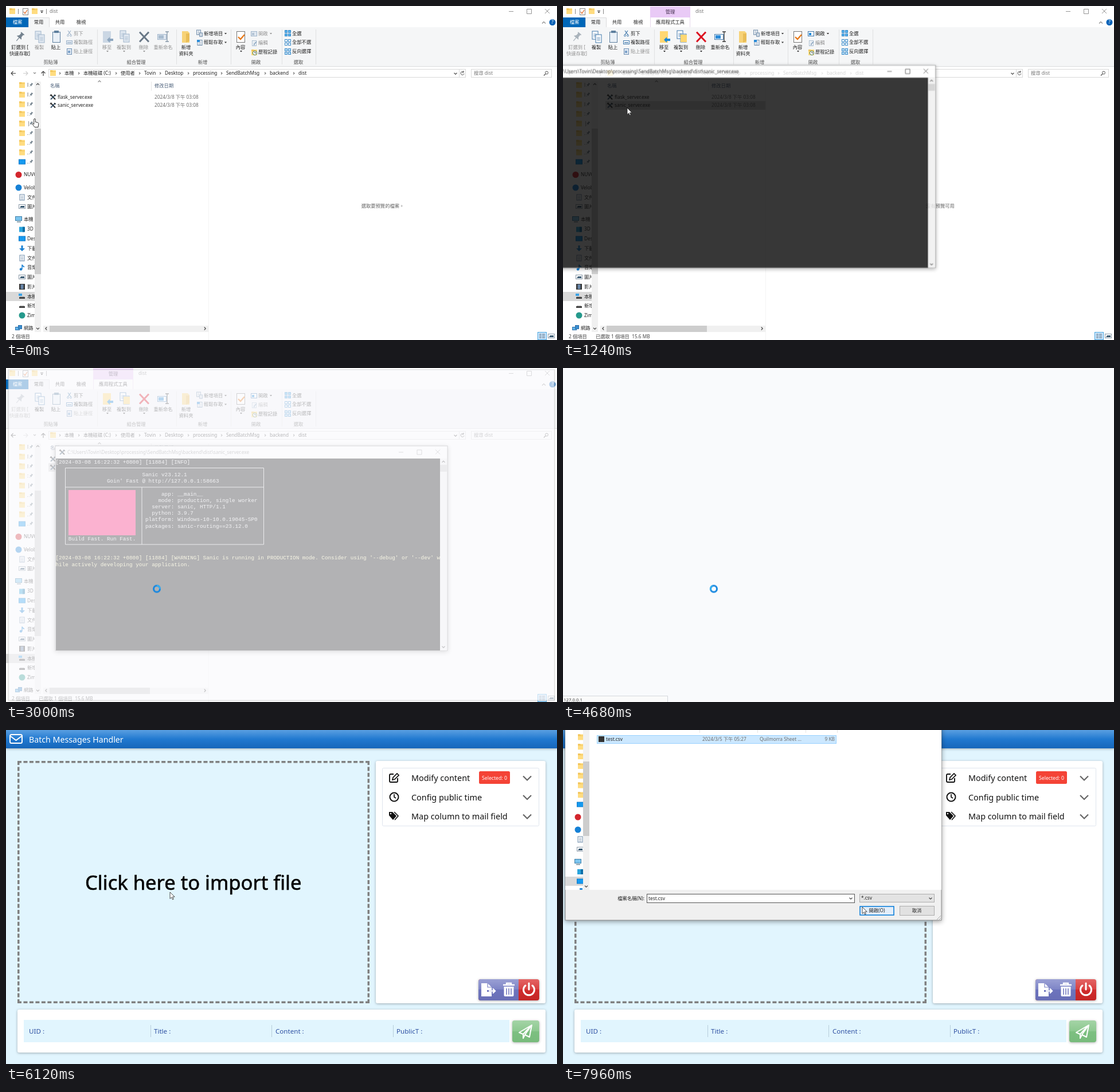
These frames come from a looping animation (961 by 583 pixels, 8000 ms). An HTML page:

```html
<!DOCTYPE html>
<html lang="zh-Hant">
<head>
<meta charset="utf-8">
<title>Batch Messages Handler</title>
<style>
html, body { margin: 0; width: 100%; height: 100%; overflow: hidden; background: #fff; }
svg { display: block; width: 961px; height: 583px; font-family: "Noto Sans", "Noto Sans CJK TC", sans-serif; }
text { white-space: pre; }
.mono { font-family: "Liberation Mono", monospace; }
.window { filter: drop-shadow(0 2px 4px rgba(0,0,0,.4)); }
.card { filter: drop-shadow(0 1px 2px rgba(0,0,0,.3)); }
#console { transform-origin: 427px 315px; }
#browser { transform-origin: 480px 291px; }
#dialog { transform-origin: 332px 106px; }
</style>
</head>
<body>
<svg id="stage" viewBox="0 0 961 583"></svg>
<script>
const LOOP = 8000;

// Drawing helpers
const R = (x, y, w, h, fill, more = '') =>
  `<rect x="${x}" y="${y}" width="${w}" height="${h}" fill="${fill}" ${more}/>`;
const B = (x, y, w, h, fill, stroke, more = '') =>
  R(x + .5, y + .5, w - 1, h - 1, fill, `stroke="${stroke}" ${more}`);
const C = (x, y, r, fill, more = '') => `<circle cx="${x}" cy="${y}" r="${r}" fill="${fill}" ${more}/>`;
const P = (d, fill = 'none', stroke = 'none', w = 1, more = '') =>
  `<path d="${d}" fill="${fill}" stroke="${stroke}" stroke-width="${w}" ${more}/>`;
const T = (x, y, s, fill = '#222', size = 8.3, more = '') =>
  `<text x="${x}" y="${y + size * .36}" fill="${fill}" font-size="${size}" ${more}>${s}</text>`;
const M = (x, y, s, fill) => T(x, y, s, fill, 8.3, 'text-anchor="middle"');
const G = (id, body, more = '') => `<g id="${id}" ${more}>${body}</g>`;
const at = (x, y, body, more = '') => `<g transform="translate(${x} ${y}) ${more}">${body}</g>`;
const chevron = (x, y, deg, s = 2.5, color = '#444', w = 1.1) =>
  at(x, y, P(`M${-s} ${-s / 2}L0 ${s / 2}L${s} ${-s / 2}`, 'none', color, w), `rotate(${deg})`);
const drop = (x, y, color = '#333') => P(`M${x - 2} ${y - 1}h4l-2 2.4z`, color);
const gradient = (id, ...stops) => `<linearGradient id="${id}" x2="0" y2="1">${stops.map(([o, c]) =>
  `<stop offset="${o}" stop-color="${c}"/>`).join('')}</linearGradient>`;

// Icons, centred on x, y
const folder = (x, y) => R(x - 5, y - 5, 10, 10, '#ffdc80') + P(`M${x - 5} ${y - 5}h4l1 2h5v1h-10z`, '#f2c55c');
const paper = (x, y, w = 9, h = 11, edge = '#6d8aa8', fill = '#fff') =>
  B(x - w / 2, y - h / 2, w, h, fill, edge) +
  P(`M${x - w / 4} ${y - 2}h${w / 2}m${-w / 2} 2.5h${w / 2}m${-w / 2} 2.5h${w / 2}`, 'none', edge, .8);
const picture = (x, y) => B(x - 6, y - 4, 12, 8, '#fff', '#8b9aa8') + P(`M${x - 4} ${y + 2}l2-3h6v3z`, '#35566f');
const screen = (x, y) => B(x - 6, y - 4.5, 12, 9, '#159af0', '#0b78c8');
const computer = (x, y) => B(x - 6, y - 5, 12, 8, '#7cc5ef', '#3f7ea6') + R(x - 3, y + 4, 7, 1.5, '#6b8798');
const disk = (x, y) => R(x - 5, y + 1, 10, 3, '#444') + R(x - 4, y, 8, 1, '#aaa');
const dot = color => (x, y) => C(x, y, 5.5, color);
const cube = (x, y) => R(x - 5, y - 4, 8, 9, '#2aa5dd') + R(x + 1, y - 4, 4, 9, '#0d6fa8');
const download = (x, y) => P(`M${x - 1.5} ${y - 5}h3v5h3.5l-5 5-5-5h3.5z`, '#1d83d4');
const note = (x, y) => C(x - 2, y + 3, 2.3, '#1d83d4') + P(`M${x} ${y + 3}v-8q1 3 4 4`, 'none', '#1d83d4', 1.5);
const film = (x, y) => R(x - 5, y - 5, 10, 10, '#333') + R(x - 2.5, y - 4, 5, 8, '#6885a8');
const net = (x, y) => B(x - 6, y - 2, 8, 6, '#62b5ea', '#2c6ea8') + B(x - 1, y - 5, 7, 7, '#3a8ed0', '#2c6ea8');
const pin = (x, y, k, color) => at(x, y,
  P('M-3-7h6v1.5h-1v4l2.5 3h-4v6h-1v-6h-4l2.5-3v-4h-1z', color), `rotate(40) scale(${k})`);
const tools = (x, y) => P(`M${x - 4} ${y - 4}l8 8`, 'none', '#222', 1.8) +
  P(`M${x + 4} ${y - 4}l-8 8`, 'none', '#39556d', 1.8) + P(`M${x - 5} ${y - 2}l2-3m5 1l3 2`, 'none', '#222', 1.3);
const winButtons = (x, y, gap, color = '#333') => P(`M${x - 4} ${y + .5}h8M${x + gap - 4} ${y - 3.5}h8v8h-8z` +
  `M${x + 2 * gap - 4} ${y - 4}l8 8m0-8l-8 8`, 'none', color, .9);

const grey = '#929292';

function ribbon(active) {
  const ink = active ? '#222' : grey, off = active ? grey : '#222';
  const edge = active ? '#3f77aa' : '#9fb4ca', sheet = active ? '#fff' : '#dfe7f0';
  const two = (x, y) => paper(x - 3, y - 3, 11, 15, edge, sheet) + paper(x + 3, y + 3, 11, 15, edge, sheet);
  const arrow = (x, y) => P(`M${x} ${y}l5-5v3h6v4h-6v3z`, active ? '#1a86d8' : '#8da6bf');
  return pin(24, 54, 1.2, active ? '#aab3bb' : '#74828f') +
    M(24, 72, '釘選到 [', off) + M(24, 83, '快速存取]', off) +
    two(59, 54) + M(58, 72, '複製', ink) +
    P('M108 43l5 7m0-7l-5 7', 'none', edge, 1.2) + C(108, 51.5, 1.5, 'none', `stroke="${edge}"`) +
    C(113, 51.5, 1.5, 'none', `stroke="${edge}"`) + T(118, 48, '剪下', ink) +
    B(105, 60, 11, 7, sheet, edge) + P('M107 64h7', 'none', edge, 1.5) + T(118, 63.5, '複製路徑', ink) +
    R(169, 44, 14, 20, active ? '#ffd772' : '#cbd7e4') + arrow(176, 59) + M(176, 72, '移至', ink) + drop(177, 79, ink) +
    two(207, 53) + (active ? R(205, 50, 11, 13, '#ffd772') : '') + M(205.5, 72, '複製到', ink) + drop(206, 79, ink) +
    P('M233 45.5l16 17m0-17l-16 17', 'none', active ? '#dc1020' : '#697887', 3) + M(240, 72, '刪除', ink) + drop(241, 79, ink) +
    B(264, 49, 16, 10, sheet, edge) + R(266, 51, 9, 6, active ? '#2a8bd8' : '#a9bccf') +
    P('M278 45h6m-3 0v17m-3 0h6', 'none', active ? '#333' : '#8395a6', 1.3) + M(274, 72, '重新命名', ink) +
    B(427, 44, 11, 9, sheet, edge) + R(429, 47, 4, 4, active ? '#1a86d8' : '#b2c3d4') + T(440, 48, '開啟', ink) + drop(462, 48, ink);
}

function ribbonFixed() {
  const tile = (x, y, fill) => [0, 6].map(i => [0, 6].map(j => B(x + i, y + j, 5, 5, fill, '#3689c9')).join('')).join('');
  return R(0, 37, 961, 68, '#f5f6f7') + R(0, 105, 961, 1, '#dadbdc') +
    R(0, 20, 39, 17, '#0067b8') + M(20, 28, '檔案', '#fff') +
    P('M39.5 37v-16.5h36v16.5', '#f5f6f7', '#dadbdc') + M(57, 28, '常用') + M(94, 28, '共用') + M(131, 28, '檢視') +
    [159, 297, 392, 481, 540].map(x => R(x, 41, 1, 61, '#e0e1e2')).join('') +
    [[78, '剪貼簿'], [227, '組合管理'], [343, '新增'], [436, '開啟'], [510, '選取']].map(([x, s]) => M(x, 98, s, '#555')).join('') +
    B(81, 45, 14, 19, '#e9f0f7', '#5d7f9e') + R(84, 43, 8, 4, '#5d7f9e') + M(87, 72, '貼上') +
    B(106, 74, 9, 11, '#dfe8f2', '#6e90b4') + R(108, 78, 4, 4, '#7ba0c8') + T(118, 79, '貼上捷徑', grey) +
    P('M307 44h10l3 3v17h-13z', '#f7d378') + P('M314 48h6v13l-6 3z', '#e9bd58') + M(314, 72, '新增') + M(314, 83, '資料夾') +
    paper(336, 46, 8, 9) + paper(340, 50, 6, 7) + T(345, 48, '新增項目') + drop(383, 48) +
    paper(338, 64, 9, 10) + R(333, 59, 5, 4, '#2a8bd8') + T(345, 63.5, '輕鬆存取') + drop(383, 63.5) +
    B(402, 44, 15, 20, '#fff', '#777') + P('M405 54l4 4 7-8', 'none', '#e77818', 2.4) + M(409, 72, '內容') + drop(410, 79) +
    paper(433, 65, 8, 10, '#a8bccf') + P('M432 68l5-6', 'none', '#8aa5c0', 1.5) + T(440, 64, '編輯', grey) +
    folder(433, 81) + C(434, 82, 3.6, '#fff', 'stroke="#3f6f45"') + P('M434 80v2h2', 'none', '#333') + T(440, 80, '歷程記錄') +
    tile(486, 42, '#58b4ee') + T(499, 48, '全選') + tile(486, 58, '#fff') + T(499, 63, '全部不選') +
    tile(486, 74, '#bfe1f7') + T(499, 79, '反向選擇') +
    chevron(938, 29, 180, 3, '#888') + C(953, 28.5, 5.5, '#0a63b8') + M(953, 28.5, '?', '#fff');
}

function sidebar() {
  const rows = [[294.5, dot('#d3262d'), 'NUVO'], [317, dot('#1681d6'), 'Velobox'], [334, paper, '文件'], [350, picture, '圖片'],
    [372, computer, '本機'], [389.5, cube, '3D 物件'], [406, screen, 'Desktop'], [423, download, '下載'], [440, paper, '文件'],
    [456.5, note, '音樂'], [473, picture, '圖片'], [490, film, '影片'], [507, disk, '本機磁碟'], [523, disk, '新增'],
    [540, dot('#25998c'), 'Zimp'], [562, net, '網路']];
  const quick = [...'lll:|...'].map((c, i) => {
    const y = 138 + i * 16.8;
    return folder(28, y) + T(37, y, c, '#555') + pin(43.5, y, .55, '#71808c');
  }).join('');
  return R(0, 499, 50, 16, '#d9d9d9') + quick + screen(28, 272) + T(37, 272, '.', '#555') + pin(43.5, 272, .55, '#71808c') +
    '<clipPath id="pane"><rect y="130" width="50" height="440"/></clipPath><g clip-path="url(#pane)">' +
    rows.map(([y, icon, s]) => {
      const outer = [294.5, 317, 372, 562].includes(y);
      return icon(outer ? 22 : 28, y) + T(outer ? 31 : 37, y, s);
    }).join('') + '</g>' + R(22, 502, 6, 4, '#3aa2e6') +
    R(50, 132, 11, 437, '#f0f0f0') + R(50, 214, 11, 254, '#cdcdcd') + chevron(55.5, 136.5, 180) + chevron(55.5, 563, 0);
}

function explorer() {
  const crumbs = [[102, '本機'], [135, '本機磁碟 (C:)'], [200, '使用者'], [241, 'Tovin'], [277, 'Desktop'],
    [326, 'processing'], [384, 'SendBatchMsg'], [460, 'backend'], [510, 'dist']];
  const file = (y, name) => tools(82, y) + T(90, y, name) + T(259, y, '2024/3/8 下午 03:08', '#6d6d6d');
  const row = (id, fill) => G(id, R(74, 166, 279, 15, fill));
  return R(0, 0, 961, 583, '#fff') + folder(11, 9) + R(21, 5, 1, 9, '#888') + B(29, 4, 10, 12, '#fff', '#888') +
    P('M31 10l2 3 4-6', 'none', '#e06a28', 1.3) + folder(50, 9) + P('M60 8.5h5', 'none', '#333') + drop(62.5, 11) +
    R(70, 5, 1, 9, '#888') + winButtons(881, 9, 31.5, '#8a8a8a') + ribbonFixed() +
    G('idle', T(76, 9.5, 'dist', '#777') + ribbon(false) + M(657, 349.5, '選取要預覽的檔案。', '#666')) +
    G('active', R(152, 1, 70, 19, '#e9caf6') + M(187, 10.5, '管理', '#45304f') +
      P('M152.5 20v17m69-17v17', 'none', '#e6d7ec') + M(187, 28, '應用程式工具') + T(231, 9.5, 'dist', '#777') +
      ribbon(true) + M(658, 349.5, '沒有預覽可用', '#666') + T(57, 577, '已選取 1 個項目  15.6 MB', '#444')) +
    P('M17 117.5h-8m3.5-3.5l-3.5 3.5 3.5 3.5', 'none', '#444', 1.1) +
    P('M30 117.5h8m-3.5-3.5l3.5 3.5-3.5 3.5', 'none', '#ccc', 1.1) + chevron(50, 117, 0, 2, '#888') +
    P('M65 122v-8m-3.5 3.5l3.5-3.5 3.5 3.5', 'none', '#444', 1.2) +
    B(74, 110, 728, 15, '#fff', '#d9d9d9') + folder(82, 117) +
    crumbs.map(([x, s]) => chevron(x - 8, 117.5, -90, 1.8, '#666') + T(x, 117.5, s)).join('') +
    chevron(784, 118, 0) + R(790, 110, 1, 15, '#d9d9d9') + P('M798 115a3 3 0 1 0 1 3m-1-5v3h-3', 'none', '#555') +
    B(811, 110, 141, 15, '#fff', '#d9d9d9') + T(816, 117.5, '搜尋 dist', '#777') +
    C(943, 116.5, 2.5, 'none', 'stroke="#555"') + P('M941 118.5l-3 3', 'none', '#555', 1.3) +
    sidebar() + chevron(163, 131.5, 180, 2.5, '#888') + T(77, 139, '名稱', '#4c607a') + R(253, 132, 1, 16, '#e5e5e5') +
    T(259, 139, '修改日期', '#4c607a') + row('hover', '#e5f3ff') + row('selected', '#cce8ff') + row('resting', '#d9d9d9') +
    file(159, 'flask_server.exe') + file(173.5, 'sanic_server.exe') +
    R(353, 132, 1, 451, '#f3f3f3') + R(65, 558, 288, 11, '#f0f0f0') + R(76, 558, 175, 11, '#cdcdcd') +
    chevron(70, 563, 90) + chevron(347, 563, -90) + T(10, 577, '2 個項目', '#444') +
    B(927, 569, 16, 14, '#cce8ff', '#4aa3dc') + P('M930 573h4m1 0h5M930 576h4m1 0h5M930 579h4m1 0h5', 'none', '#456') + picture(951, 576);
}

function consoleWindow() {
  const col = n => 86.5 + 5.59 * n, line = n => 163.5 + 11.17 * n;
  const put = (n, c, s, fill = '#e4e4e4') => T(col(c), line(n), s, fill, 9.32, 'class="mono"');
  const stamp = '[2024-03-08 16:22:32 +0800] [11884] ';
  const facts = [['app', '__main__'], ['mode', 'production, single worker'], ['server', 'sanic, HTTP/1.1'],
    ['python', '3.9.7'], ['platform', 'Windows-10-10.0.19045-SP0'], ['packages', 'sanic-routing==23.12.0']];
  const output = put(0, 0, stamp + '[INFO]') +
    P('M103.5 174.5h346v133.5h-346zM103.5 208h346M237 208v100', 'none', '#ccc') +
    put(2, 27, 'Sanic v23.12.1') + put(3, 16, "Goin' Fast @ http://127.0.0.1:58663") + R(109, 213, 117, 79, '#ff0d68') +
    facts.map(([k, v], i) => put(5 + i, 36 - k.length, k + ':') + put(5 + i, 38, v)).join('') +
    put(12, 4, 'Build Fast. Run Fast.') +
    put(15, 0, stamp + "[WARNING] Sanic is running in PRODUCTION mode. Consider using '--debug' or '--dev' w", '#f5efb0') +
    put(16, 0, 'hile actively developing your application.', '#f5efb0');
  return R(86, 136, 684, 357, '#fff', 'stroke="#777" stroke-width=".8"') + tools(98, 147) +
    G('caption', T(107, 147, 'C:\\Users\\Tovin\\Desktop\\processing\\SendBatchMsg\\backend\\dist\\sanic_server.exe') + winButtons(689, 146.5, 32)) +
    R(87, 158, 670, 335, '#0c0c0c') + R(757, 158, 12, 335, '#f0f0f0') + R(757, 169, 12, 12, '#cdcdcd') +
    chevron(763, 163.5, 180) + chevron(763, 487, 0) + G('caret', R(87, 166, 5, 2, '#eee')) + G('output', output);
}

function app() {
  const dashed = (d, gap) => P(d, 'none', '#808080', 3.5, `stroke-dasharray="7 ${gap}"`);
  const option = (y, s) => T(707, y, s, '#111', 14.4) + chevron(909, y, 0, 7, '#666', 2.2);
  const fields = [[40, 'UID :'], [258, 'Title :'], [470, 'Content :'], [681, 'PublicT :']];
  return R(0, 0, 961, 583, '#e1f5fe') + R(0, 0, 961, 32, 'url(#blue)', 'class="card"') +
    R(7, 8, 21, 15, 'none', 'rx="2.5" stroke="#fff" stroke-width="2"') + P('M8 11l9.5 7 9.5-7', 'none', '#fff', 2) +
    T(40, 16.5, 'Batch Messages Handler', '#fff', 14.2) +
    dashed('M20 55.75h614M20 475.25h614', 3.466) + dashed('M21.75 54v423M632.25 54v423', 3.4) +
    T(138, 267, 'Click here to import file', '#000', 34.6, 'stroke="#000" stroke-width=".6"') +
    R(645, 54, 296, 423, '#fff', 'rx="3" class="card"') + B(656, 66, 274, 102, '#fff', '#dfe5ee', 'rx="2"') +
    option(84, 'Modify content') + option(117.5, 'Config public time') + option(151, 'Map column to mail field') +
    R(825, 72, 54, 22, '#f44336', 'rx="2.5"') + T(830, 83.5, 'Selected: 0', '#fff', 8.7) +
    P('M676 77h-5q-2 0-2 2v10q0 2 2 2h10q2 0 2-2v-5', 'none', '#111', 1.9) + P('M674 87l1-4 7-7 3 3-7 7z', '#fff', '#111', 1.7) +
    C(677, 117, 7.5, 'none', 'stroke="#111" stroke-width="2"') + P('M677 112v5l3 2', 'none', '#111', 1.7) +
    P('M668 143h6l7 7-6 7-7-8z', '#111') + P('M677 143l7 7-6 7', 'none', '#111', 1.6) + C(671, 146, 1.2, '#fff') +
    `<g class="card">${R(824, 435, 106, 37, 'url(#red)', 'rx="4"')}${P('M828 435h66v37h-66q-4 0-4-4v-29q0-4 4-4z', 'url(#violet)')}</g>` +
    P('M829 442h11l7 7v5h-8v3h8v8h-18z', '#fff') + P('M840 442v7h7', 'none', '#7b80c4', 1.2) +
    P('M842 455.5h11m-4-4l4 4-4 4', 'none', '#fff', 2.3) +
    P('M867 445h20M873 444v-2h8v2', 'none', '#fff', 2.3) + P('M868.5 448h17v15q0 2-2 2h-13q-2 0-2-2z', '#fff') +
    P('M873 451v11m4-11v11m4-11v11', 'none', '#757ac0', 1.6) +
    P('M906 446a9.5 9.5 0 1 0 12 0M912 442v11', 'none', '#fff', 3, 'stroke-linecap="round"') +
    R(20, 488, 921, 75, '#fff', 'rx="3" class="card"') + R(31, 506, 847, 39, '#e1f5fe') +
    [252, 463, 675].map(x => R(x, 515, 1, 21, '#b7cddb')).join('') +
    fields.map(([x, s]) => T(x, 525.5, s, '#2f51a3', 11.6)).join('') +
    R(883, 507, 47, 38, 'url(#green)', 'rx="4" class="card"') +
    P('M895 528l22-13-4 21-8-4-3 6v-7zM902 531l14-15-11 16', 'none', '#fff', 2, 'stroke-linejoin="round"');
}

function dialog() {
  const icons = [[130, screen], [152, dot('#d3262d')], [174, dot('#1681d6')], [191, paper], [208, picture],
    [230, computer], [247, cube], [264, screen]];
  return R(4, -130, 656, 462, '#f0f0f0', 'stroke="#777" stroke-width=".8"') + R(4, -60, 656, 339, '#fff') +
    R(4, 256, 31, 16, '#d9d9d9') + [...Array(7).keys()].map(i => folder(31, 12.5 + i * 16.8)).join('') +
    icons.map(([y, icon]) => icon([152, 174, 230].includes(y) ? 26 : 30, y)).join('') + R(29, 276, 5, 3, '#2a8bd8') +
    R(35, -60, 11, 339, '#f0f0f0') + R(35, 55, 11, 130, '#cdcdcd') + chevron(40.5, 273, 0) +
    [238, 339, 423, 478].map(x => R(x, 0, 1, 5, '#e5e5e5')).join('') +
    G('picked', B(59, 9, 418, 15, '#cce8ff', '#99d1ff')) +
    G('listing', R(62, 11, 10, 10, '#333') + T(75, 16.5, 'test.csv') +
      T(243, 16.5, '2024/3/5 下午 05:27', '#6d6d6d') + T(343, 16.5, 'Quilmorra Sheet ...', '#6d6d6d') +
      T(474, 16.5, '9 KB', '#6d6d6d', 8.3, 'text-anchor="end"')) +
    T(142, 294, '檔案名稱(N):', '#222', 8.3, 'text-anchor="end"') + B(146, 286, 363, 16, '#fff', '#555') + chevron(502, 294, 0) +
    G('filename', T(149, 294, 'test.csv')) + B(517, 286, 131, 15, '#e3e3e3', '#adadad') + T(520, 293.5, '*.csv') + chevron(641, 294, 0) +
    R(518, 308, 59, 15, '#e3eefa', 'stroke="#0078d7" stroke-width="1.5"') + M(547.5, 315, '開啟(O)') +
    B(587, 307, 61, 17, '#e1e1e1', '#adadad') + M(617, 315, '取消') + P('M652 331l7-7m-3 7l3-3', 'none', '#aaa');
}

const ring = C(0, 0, 5.5, 'none', 'stroke="#1787e0" stroke-width="3"') +
  G('spin', P('M0-5.5a5.5 5.5 0 0 1 5.5 5.5', 'none', '#35aff0', 3));
const arrow = P('M0 0v11.5l2.7-2.6 1.8 4.1 1.8-.8-1.8-4h3.7z', '#fff', '#222', .8);
const hand = P('M-1.3 1a1.3 1.3 0 0 1 2.6 0v4.5l4.2 1q1.5.5 1.3 2l-.8 6h-6l-4-5.5q.5-1.5 1.8-.6l.9 1z', '#fff', '#222', .9);

stage.innerHTML = '<defs>' +
  gradient('blue', [0, '#5a9fe1'], [.5, '#2179d0'], [1, '#1666ba']) +
  gradient('violet', [0, '#9aa0d4'], [.5, '#7d84c6'], [.5, '#6d74bd'], [1, '#686eb6']) +
  gradient('red', [0, '#e36464'], [.5, '#d94040'], [.5, '#d02c2c'], [1, '#c42525']) +
  gradient('green', [0, '#a4d4a6'], [.5, '#8cc88f'], [.5, '#7dc081'], [1, '#78bb7c']) + '</defs>' +
  G('explorer', explorer()) + G('console', consoleWindow(), 'class="window"') +
  G('browser', R(0, 0, 961, 583, '#f9fafc', 'stroke="#bbb"')) +
  G('status', B(-1, 572, 184, 12, '#fafafa', '#d5d8dc') + T(1, 579, '127.0.0.1', '#444', 7.8)) +
  G('app', app()) + G('dialog', dialog(), 'class="window"') +
  G('hand', at(50, 197, hand)) + G('arrow', arrow) + G('ring', at(263, 385.5, ring));

// Motion: tables of [ms, value]
function play(id, prop, steps, easing = 'linear') {
  const table = [[0, steps[0][1]], ...steps, [LOOP, steps.at(-1)[1]]];
  document.getElementById(id).animate(
    table.map(([ms, value]) => ({ offset: ms / LOOP, [prop]: value, easing })),
    { duration: LOOP, iterations: Infinity });
}
const show = (id, from, to = LOOP) =>
  play(id, 'opacity', [[0, from ? 0 : 1], [from, 1], ...(to < LOOP ? [[to, 0]] : [])], 'step-end');
const move = (x, y, scale = 1) => `translate(${x}px, ${y}px) scale(${scale})`;

show('hand', 0, 130);
show('idle', 0, 600);
show('active', 600);
show('hover', 270, 560);
show('selected', 560, 1160);
show('resting', 1160);
show('caret', 1300, 2600);
show('output', 2600);
show('status', 3500, 4920);
show('app', 4920);
show('ring', 2800, 4920);
show('listing', 6640);
show('picked', 7340);
show('filename', 7340);
play('caption', 'opacity', [[0, 1], [2900, .55]], 'step-end');

play('console', 'opacity', [[1160, 0], [1240, .82], [1310, 1]]);
play('console', 'transform', [[1160, move(-117, -34.5, .95)], [1240, move(-117, -34.5, .99)], [1310, move(-117, -34.5)],
  [1720, move(-117, -34.5)], [1900, move(-50, -14)], [2130, move(0, 0)]]);
play('browser', 'opacity', [[2860, 0], [3000, .7], [3150, 1]]);
play('browser', 'transform', [[2860, move(0, 0, .96)], [3000, move(0, 0, .991)], [3150, move(0, 0, 1.01)]]);
play('dialog', 'opacity', [[6400, 0], [6560, 1]]);
play('dialog', 'transform', [[6400, move(0, 0, .94)], [6560, move(0, 0)]]);

play('arrow', 'opacity', [[0, 0], [130, 1], [2800, 0], [4920, 1]], 'step-end');
play('arrow', 'transform', [[70, move(52, 197)], [400, move(112, 178)], [1370, move(112, 178)], [1660, move(89, 115)],
  [1720, move(89, 115)], [1900, move(156, 135)], [2130, move(206, 149)], [2390, move(206, 149)], [2800, move(259, 380)],
  [5700, move(259, 380)], [6050, move(286, 283)], [6680, move(286, 283)], [7200, move(150, 16)],
  [7420, move(150, 16)], [7900, move(522, 309)]]);
document.getElementById('spin').animate(
  { transform: ['rotate(0deg)', 'rotate(360deg)'] }, { duration: 1000, iterations: Infinity });
</script>
</body>
</html>
```
